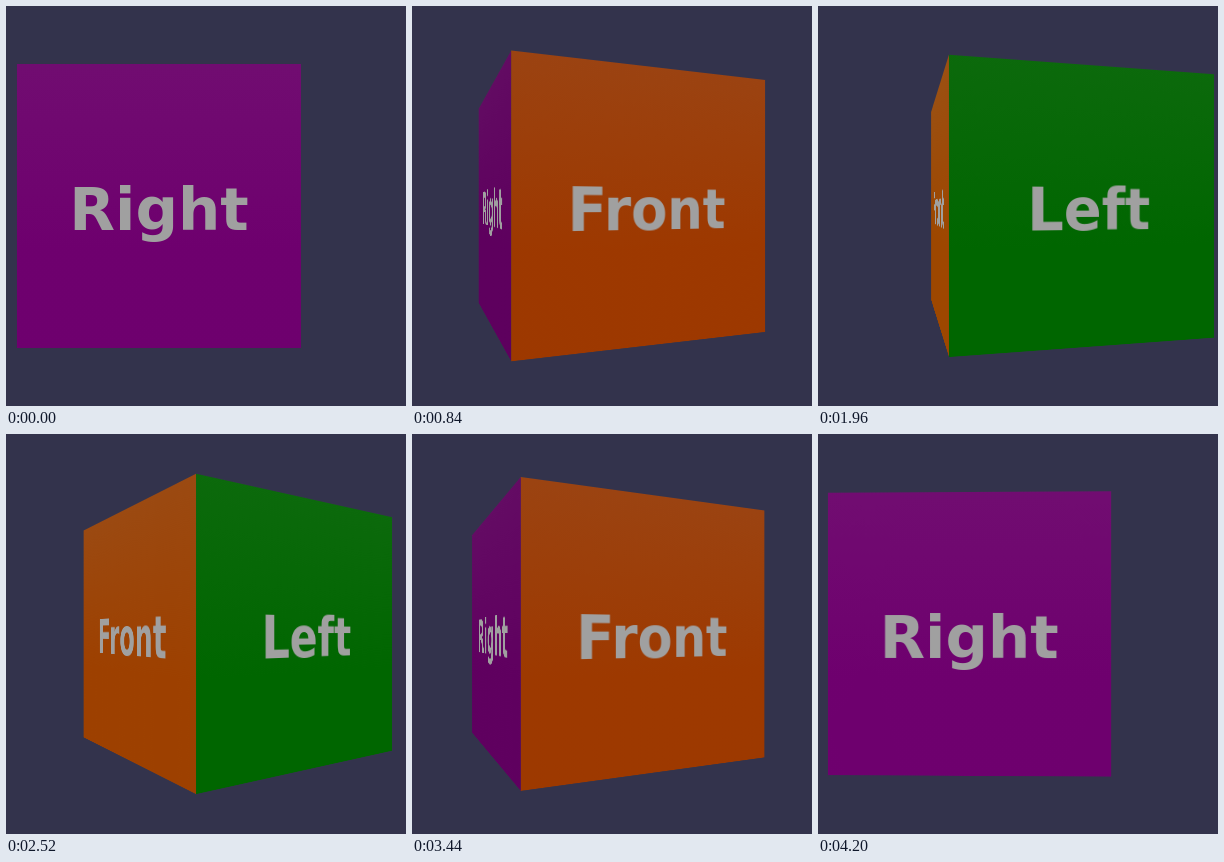
Recreate the animation shown at these times as an HTML page. Size 400x400 px, loop 4240 ms.

```html
<!DOCTYPE html>
<html lang="en">
<head>
<meta charset="utf-8">
<title>Turning cube</title>
<style>
  html, body { margin: 0; width: 100%; height: 100%; overflow: hidden; background: #33334c; }
  #stage { position: relative; width: 400px; height: 400px; overflow: hidden; perspective: 482.84px; }
  #cube {
    position: absolute; left: 58px; top: 58px; width: 284px; height: 284px;
    transform-style: preserve-3d;
    /* The cube slides sideways in proportion to its turn. */
    transform: translate3d(calc(var(--turn) * -0.5226px), 0, -142px) rotateY(calc(var(--turn) * 1deg));
  }
  .face {
    --slant: calc(1 - cos((var(--turn) + var(--side)) * 1deg));
    --h: calc(var(--hue) + var(--warm) * var(--slant));
    --l: calc(var(--light) - var(--dim) * var(--slant));
    position: absolute; inset: 0; backface-visibility: hidden;
    font: bold 59.5px/292px "DejaVu Sans", Verdana, sans-serif;
    text-align: center; white-space: nowrap; color: #a0a0a0;
    background: linear-gradient(
      hsl(var(--h) 80% calc((var(--l) + 3) * 1%)),
      hsl(var(--h) 100% calc(var(--l) * 1%)) 65%);
    transform: rotateY(calc(var(--side) * 1deg)) translateZ(142px);
  }
  .right { --side: -90; --hue: 300; --light: 21.6; --warm: 0; --dim: 5; }
  .front { --side: 0; --hue: 21; --light: 30.8; --warm: 8; --dim: 0; }
  .left { --side: 90; --hue: 120; --light: 20; --warm: 0; --dim: 0; }
</style>
</head>
<body>
<div id="stage">
  <div id="cube" style="--turn: 90">
    <div class="face right">Right</div>
    <div class="face front">Front</div>
    <div class="face left">Left</div>
  </div>
</div>
<script>
  const LOOP = 4240, STEP = 40;
  const SWING = 88.1, CENTRE = 1.9; // degrees
  const SHARP = 0.996; // 1 gives a triangle wave, less rounds its tips
  const cube = document.getElementById('cube');

  function turnAt(t) {
    const wave = Math.asin(SHARP * Math.cos(2 * Math.PI * t / LOOP)) / Math.asin(SHARP);
    return CENTRE + SWING * wave;
  }

  const start = performance.now();
  function tick() {
    const t = (performance.now() - start) % LOOP;
    cube.style.setProperty('--turn', turnAt(Math.floor(t / STEP) * STEP).toFixed(3));
    requestAnimationFrame(tick);
  }
  tick();
</script>
</body>
</html>
```
